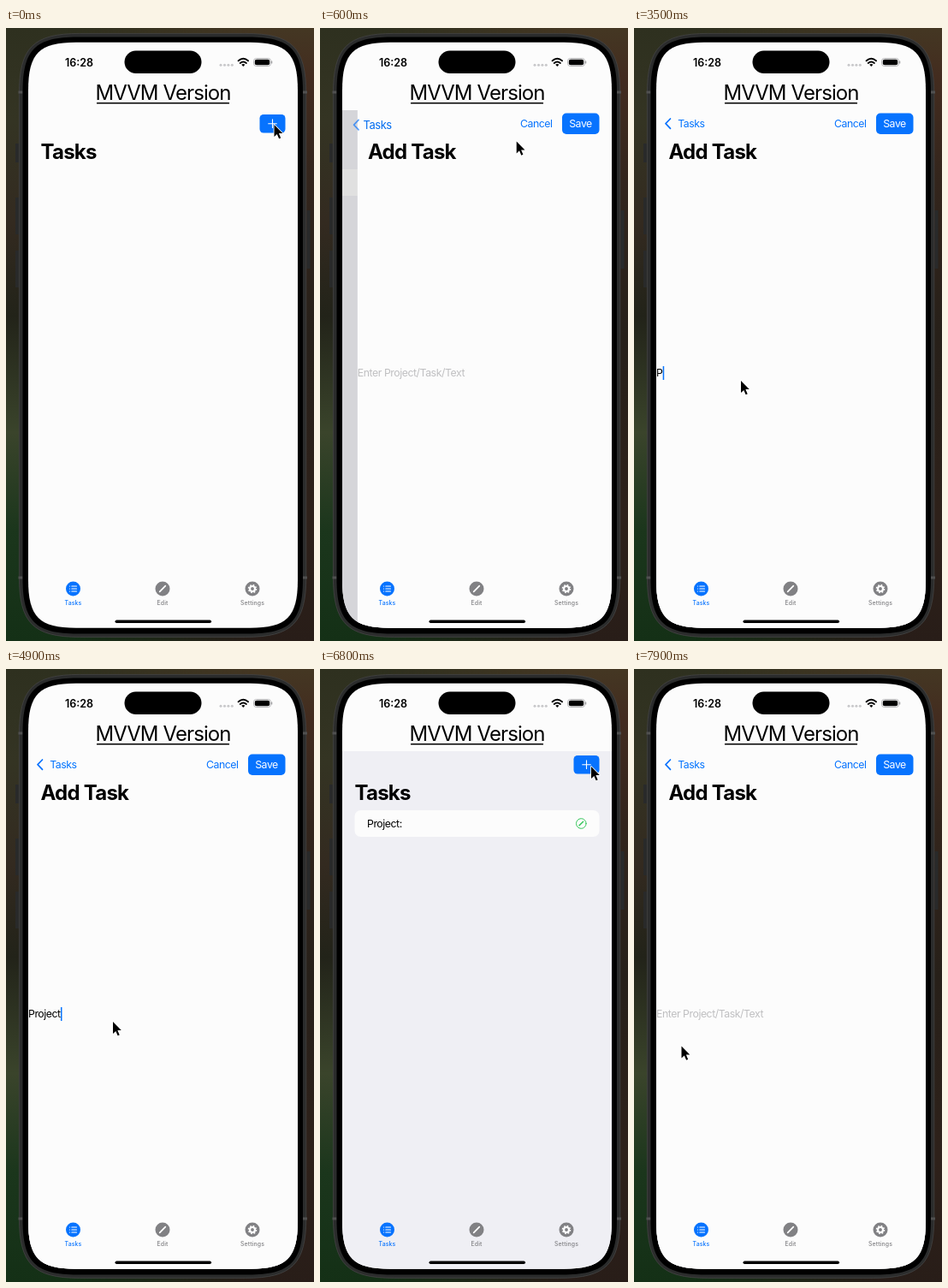
These frames come from a looping animation (360 by 716 pixels, 8000 ms). An HTML page:

```html
<!DOCTYPE html>
<html lang="en">
<head>
<meta charset="utf-8">
<title>Task list</title>
<style>
html, body { margin: 0; width: 100%; height: 100%; overflow: hidden; background: #1c1d17; }
svg { display: block; width: 360px; height: 716px; font-family: Inter, Roboto, sans-serif; }
text { white-space: pre; }
.body { font-size: 12.3px; letter-spacing: -.037em; }
.large { font-size: 24px; font-weight: 700; letter-spacing: -.032em; }
.tab { font-size: 6.9px; font-weight: 500; letter-spacing: .02em; text-anchor: middle; }
.blue { fill: #0773fe; }
.gray { fill: #818184; }
.line { fill: none; stroke-linecap: round; stroke-linejoin: round; }
</style>
</head>
<body>
<svg viewBox="0 0 360 716">
  <defs>
    <linearGradient id="left" x2="0" y2="1">
      <stop stop-color="#2e301f"/><stop offset=".15" stop-color="#343423"/>
      <stop offset=".32" stop-color="#332a20"/><stop offset=".47" stop-color="#222319"/>
      <stop offset=".66" stop-color="#3a442b"/><stop offset=".82" stop-color="#1b361c"/>
      <stop offset="1" stop-color="#143016"/>
    </linearGradient>
    <linearGradient id="right" x2="0" y2="1">
      <stop stop-color="#443723"/><stop offset=".08" stop-color="#432c1f"/>
      <stop offset=".25" stop-color="#33251c"/><stop offset=".5" stop-color="#272019"/>
      <stop offset=".8" stop-color="#2e211a"/><stop offset="1" stop-color="#281d18"/>
    </linearGradient>
    <linearGradient id="fade">
      <stop offset=".2" stop-color="#fff" stop-opacity="0"/><stop offset=".8" stop-color="#fff"/>
    </linearGradient>
    <mask id="blend"><rect width="360" height="716" fill="url(#fade)"/></mask>
    <clipPath id="screen"><path id="glass"/></clipPath>
    <clipPath id="below"><rect x="26" y="96" width="315" height="606"/></clipPath>
  </defs>

  <rect width="360" height="716" fill="url(#left)"/>
  <rect width="360" height="716" fill="url(#right)" mask="url(#blend)"/>
  <path d="M13 135V157M13 198V241M13 260V303M353.500 213V281" stroke="#292a2a" stroke-width="4"/>
  <path id="frame" fill="#2b2c2c" stroke="#444545" stroke-width=".800"/>
  <path d="M14.500 75H19.500M347 75H352M14.500 642H19.500M347 642H352" stroke="#505050" stroke-width="3"/>
  <path id="bezel"/>

  <g clip-path="url(#screen)">
    <rect x="26" y="16" width="315" height="686" fill="#fcfcfc"/>
    <g clip-path="url(#below)">
      <g id="list">
        <rect x="-74" y="96" width="515" height="606" fill="#efeff4"/>
        <rect id="rows" x="40.500" y="165" width="286" height="31" rx="7" fill="#fcfcfc"/>
        <g id="task">
          <text class="body" x="55" y="185">Project:</text>
          <g class="line" stroke="#35c65a">
            <circle cx="305.300" cy="180.500" r="5.800"/><path d="M303 182.800L307.600 178.200" stroke-width="1.500"/>
          </g>
        </g>
      </g>
      <rect id="dim" x="26" y="96" width="315" height="606"/>
      <g id="page">
        <rect x="26" y="96" width="315" height="606" fill="#fcfcfc"/>
        <text id="field" class="body" x="26" y="407"></text>
        <rect id="caret" class="blue" y="395" width="1.500" height="16"/>
      </g>
      <text id="addTitle" class="large" x="40.500" y="153">Add Task</text>
      <path id="chevron" class="line" d="M42.500 106L37 111.700L42.500 117.400" stroke="#0773fe" stroke-width="1.700"/>
      <text id="small" class="body">Tasks</text>
      <text id="big" class="large">Tasks</text>
      <g id="plus">
        <rect class="blue" x="296.500" y="101" width="30" height="21.500" rx="4.500"/>
        <path class="line" d="M306.700 111.700H316.300M311.500 106.900V116.500" stroke="#fff" stroke-width="1.100"/>
      </g>
      <g id="actions">
        <text class="body blue" x="234" y="116">Cancel</text>
        <rect class="blue" x="283" y="99.500" width="43.500" height="24.500" rx="5"/>
        <text class="body" x="304.500" y="116" fill="#fff" text-anchor="middle">Save</text>
      </g>
    </g>

    <text x="69" y="44.500" font-size="12.500" font-weight="600">16:28</text>
    <rect x="138.500" y="26.500" width="90" height="26.500" rx="13.250"/>
    <g fill="#c8c8ca">
      <circle cx="251" cy="43.300" r="1.500"/><circle cx="255.500" cy="43.300" r="1.500"/>
      <circle cx="259.900" cy="43.300" r="1.500"/><circle cx="264.300" cy="43.300" r="1.500"/>
    </g>
    <path class="line" d="M271.600 38.300Q277.300 33.400 283 38.300M273.700 40.900Q277.300 37.900 280.900 40.900" stroke="#000" stroke-width="1.900"/>
    <path d="M275.200 42.800Q277.300 41.300 279.400 42.800L277.300 45Z"/>
    <rect x="289.500" y="35.500" width="20" height="9" rx="3" fill="none" stroke="#a5a5a7" stroke-width=".800"/>
    <rect x="290.800" y="36.800" width="17.400" height="6.400" rx="2"/>
    <path d="M310.700 38.500V41.500" stroke="#a5a5a7" stroke-width="1.200"/>
    <text x="183.500" y="84" font-size="24" letter-spacing="-.9" text-anchor="middle">MVVM Version</text>
    <path d="M106 87.700H261" stroke="#000" stroke-width="1.400"/>

    <circle class="blue" cx="78.500" cy="655" r="8.500"/>
    <path class="line" d="M76.800 652H82.500M76.800 655H82.500M76.800 658H82.500M74.400 652H74.500M74.400 655H74.500M74.400 658H74.500" stroke="#fff" stroke-width="1.100"/>
    <circle class="gray" cx="183" cy="655" r="8.500"/>
    <path class="line" d="M179.700 658.300L186.300 651.700" stroke="#fff" stroke-width="1.700"/>
    <circle class="gray" cx="288" cy="655" r="8.500"/>
    <circle cx="288" cy="655" r="3" fill="none" stroke="#fff" stroke-width="2.200"/>
    <circle cx="288" cy="655" r="4.600" fill="none" stroke="#fff" stroke-width="1.300" stroke-dasharray="1.806"/>
    <text class="tab blue" x="78.500" y="673.500">Tasks</text>
    <text class="tab gray" x="183" y="673.500">Edit</text>
    <text class="tab gray" x="288" y="673.500">Settings</text>
    <rect x="127.500" y="691.500" width="112.500" height="3.500" rx="1.750"/>
  </g>
  <path id="cursor" d="M.500 1V15L3.800 11.900L6.100 17.300L8.200 16.400L5.900 11.100H10.300Z" stroke="#fff" stroke-width="1.700" paint-order="stroke" stroke-linejoin="round"/>
</svg>
<script>
const LOOP = 8000, WIDTH = 315;
const PUSH = 298, POP = 5591, PUSH_AGAIN = 7050;
const FOCUS = 2000, TYPE = 3430, KEY_GAP = 230;
const PROJECT = 'Project:';

// Pointer stops: time, x, y
const stops = [
  [0, 313, 112], [300, 313, 112], [600, 229.5, 131], [900, 140, 270], [1300, 78, 400],
  [2300, 78, 400], [2800, 124.5, 411], [5800, 124.5, 411], [6500, 316.5, 113],
  [7120, 316.5, 113], [7750, 55, 439.5], [8000, 55, 439.5]
];

const el = id => document.getElementById(id);
const set = (id, attrs) => { for (const k in attrs) el(id).setAttribute(k, attrs[k]); };
const clamp = v => Math.max(0, Math.min(1, v));
const mix = (a, b, k) => a + (b - a) * k;
const shift = (x, y = 0) => `translate(${x} ${y})`;

// Rectangle with smooth corners that reach e along each side
function smoothRect(x, y, w, h, e) {
  const c = e * 0.23, X = x + w, Y = y + h;
  return `M${x} ${y + e}C${x} ${y + c} ${x + c} ${y} ${x + e} ${y}` +
    `H${X - e}C${X - c} ${y} ${X} ${y + c} ${X} ${y + e}` +
    `V${Y - e}C${X} ${Y - c} ${X - c} ${Y} ${X - e} ${Y}` +
    `H${x + e}C${x + c} ${Y} ${x} ${Y - c} ${x} ${Y - e}Z`;
}

// Critically damped spring, from 1 down to 0
function settle(ms) {
  const x = Math.max(0, ms) / 66;
  return (1 + x) * Math.exp(-x);
}

// 1 = list in view, 0 = form in view
function listShare(t) {
  if (t < POP) return settle(t - PUSH);
  if (t < PUSH_AGAIN) return 1 - settle(t - POP);
  return settle(t - PUSH_AGAIN);
}

function pointer(t) {
  const i = stops.findIndex(s => s[0] > t);
  const [t0, x0, y0] = stops[i - 1], [t1, x1, y1] = stops[i];
  const k = (t - t0) / (t1 - t0);
  return [mix(x0, x1, k), mix(y0, y1, k)];
}

function drawField(t) {
  const again = t >= PUSH_AGAIN;
  const count = again ? 0 : Math.max(0, Math.floor((t - TYPE) / KEY_GAP) + 1);
  const typed = PROJECT.slice(0, count);
  const field = el('field');
  field.textContent = typed || 'Enter Project/Task/Text';
  set('field', { fill: typed ? '#000' : '#bfbfc1' });
  const focused = t >= FOCUS && t < POP - 50;
  const blink = t > TYPE || (t - FOCUS) % 1000 < 600;
  set('caret', {
    x: typed ? 26.3 + field.getComputedTextLength() : 26,
    opacity: +(focused && blink)
  });
}

// The list title shrinks into the back button and grows out of it again
function drawTitle(r) {
  const x = mix(51.2, 40.5, r), y = mix(116, 153, r * (0.7 + 0.3 * r));
  const bold = clamp(r * 4 - 0.4);
  const fill = `rgb(0 ${mix(115, 0, r)} ${mix(254, 0, r)})`;
  const place = scale => `${shift(x, y)} scale(${scale})`;
  set('small', { transform: place(1 + r), fill, opacity: 1 - bold });
  set('big', { transform: place(mix(0.39, 1, r)), fill, opacity: bold * (1 - 1.2 * r * (1 - r)) });
  set('chevron', { transform: shift(45 * r, 25 * r), opacity: clamp(1 - 6 * r) });
}

function draw(t) {
  const r = listShare(t);
  set('list', { transform: shift(-0.3 * WIDTH * (1 - r)), opacity: +(t >= 200) });
  set('rows', { height: t >= PUSH_AGAIN ? 62 : 31 });
  set('task', { opacity: +(t >= TYPE) });
  set('dim', { opacity: 0.115 * (1 - r) });
  set('page', { transform: shift(WIDTH * r) });
  set('addTitle', { transform: shift(273 * r), opacity: 1 - r ** 1.4 });
  set('plus', { opacity: clamp(r * 1.25 - 0.08) });
  set('actions', { opacity: clamp(1.15 - r * 1.15) });
  drawTitle(r);
  drawField(t);
  set('cursor', { transform: shift(...pointer(t)) });
}

set('frame', { d: smoothRect(15.4, 6.4, 335.4, 705, 71) });
set('bezel', { d: smoothRect(19.5, 10.5, 327.5, 697, 64) });
set('glass', { d: smoothRect(26, 16.8, 315, 684, 56) });

const start = performance.now();
function tick() {
  draw((performance.now() - start) % LOOP);
  requestAnimationFrame(tick);
}
tick();
</script>
</body>
</html>
```
